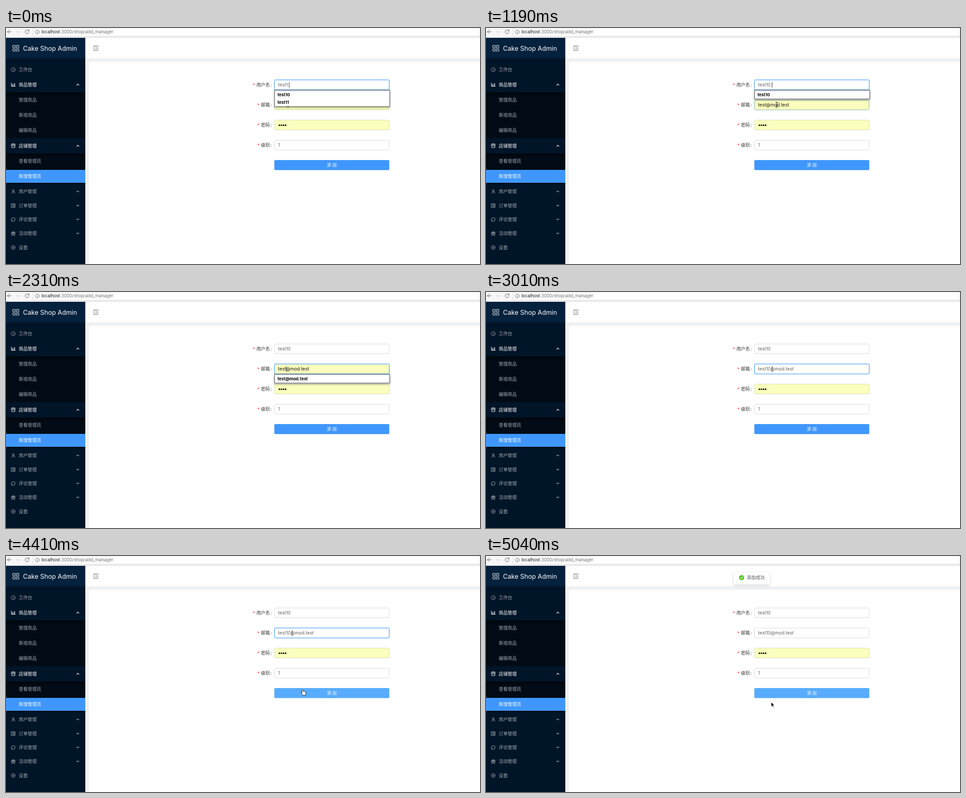
These frames come from a looping animation (1058x529 px, 5.11 s). An HTML page:

```html
<!DOCTYPE html>
<html lang="zh-CN">
<head>
<meta charset="utf-8">
<title>Admin form</title>
<style>
  html, body { margin: 0; width: 100%; height: 100%; overflow: hidden; background: #fff; }
  svg { display: block; width: 1058px; height: 529px; }
  text { font: 10px Inter, "Noto Sans CJK SC", sans-serif; white-space: pre; }
  .zh { font-family: "Noto Sans CJK SC", sans-serif; }
  .line { fill: none; stroke-width: 1; stroke-linecap: round; stroke-linejoin: round; }
  .value { fill: #606060; letter-spacing: .04px; }
  .bold { font-size: 9.3px; font-weight: 700; fill: #000; }
</style>
</head>
<body>
<svg viewBox="0 0 1058 529">
  <defs>
    <filter id="soft" x="-20%" y="-60%" width="140%" height="240%">
      <feDropShadow dx="0" dy="2" stdDeviation="2.6" flood-color="#000" flood-opacity=".35"/>
    </filter>
    <filter id="toastShade" x="-30%" y="-60%" width="160%" height="240%">
      <feDropShadow dx="0" dy="2.5" stdDeviation="3" flood-color="#000" flood-opacity=".17"/>
    </filter>
    <linearGradient id="inset" x2="0" y2="1">
      <stop offset="0" stop-color="#000" stop-opacity=".5"/>
      <stop offset="1" stop-color="#000" stop-opacity="0"/>
    </linearGradient>
  </defs>

  <!-- Page -->
  <rect width="1058" height="529" fill="#fff"/>
  <path d="M177 68H1058V76H185V529H177Z" fill="#f0f1f3"/>

  <!-- Browser bar -->
  <rect width="1058" height="22" fill="#f7f7f7"/>
  <path d="M60.5 0V16Q60.5 18.5 63 18.5H1058V0Z" fill="#fff" stroke="#d2d2d2"/>
  <path d="M0 21.5H1058" stroke="#d8d8d8"/>
  <g class="line" stroke="#5a5a5a" stroke-width="1.2">
    <path d="M11.5 8.5H3M7 4.5L3 8.5L7 12.5"/>
    <path d="M22.500 8.5H31M27 4.5L31 8.5L27 12.500" stroke="#d0d0d0"/>
    <path d="M50.700 6A4.300 4.300 0 1 0 51.300 9.500M51.400 3.800V6.800H48.400"/>
    <circle cx="70" cy="8.800" r="4.300"/>
    <path d="M70 8.500V11M70 6.600V6.700"/>
  </g>
  <text x="79" y="12.300" style="font-size:9.700px" fill="#707070"><tspan fill="#111">localhost</tspan>:3000/shop/add_manager</text>

  <!-- Sidebar -->
  <rect y="22" width="177" height="507" fill="#011528"/>
  <rect y="22" width="177" height="46" fill="#04213d"/>
  <g class="line" stroke="#fff" stroke-width="1.300">
    <path d="M15.600 39H20.600V44H15.600ZM23.600 39H28.600V44H23.600ZM15.600 46.800H20.600V51.800H15.600ZM23.600 46.800H28.600V51.800H23.600Z"/>
  </g>
  <text x="38" y="50.500" style="font-size:14.300px" fill="#fff">Cake Shop Admin</text>
  <g fill="#000b16"><rect y="144" width="177" height="103"/><rect y="281" width="177" height="69"/></g>
  <g fill="url(#inset)"><rect y="144" width="177" height="8"/><rect y="281" width="177" height="8"/></g>
  <rect y="318" width="177" height="29" fill="#3f97fd"/>
  <g id="menu"></g>

  <g class="line" stroke="#444" stroke-width="1.100">
    <path d="M195 40.500H206M200 45H206M195 49.500H206"/>
    <path d="M197.500 43.200L195 45L197.500 46.800Z" fill="#444" stroke="none"/>
  </g>

  <!-- Form -->
  <g id="form"></g>
  <g id="button">
    <rect id="face" x="599" y="296" width="256.500" height="22.500" rx="2.500"/>
    <text class="zh" x="716" y="311" fill="#fff">添 加</text>
  </g>
  <g id="list">
    <rect id="listBox" x="599.500" width="257" fill="#fff" stroke="#4a4a4a" filter="url(#soft)"/>
    <text id="item0" class="bold" x="606"></text>
    <text id="item1" class="bold" x="606"></text>
  </g>
  <path id="caret" stroke="#222"/>

  <g id="toast">
    <rect x="553" y="36" width="80.500" height="27.500" rx="2.500" fill="#fff" filter="url(#toastShade)"/>
    <circle cx="570.500" cy="48.500" r="5.700" fill="#52c41a"/>
    <path class="line" d="M568 48.700L570 50.700L573.200 46.700" stroke="#fff" style="stroke-width:1.300"/>
    <text class="zh" x="582" y="52.300" fill="#555">添加成功</text>
  </g>

  <!-- Pointers, each with its hot spot at 0,0 -->
  <g id="beam" class="line">
    <path d="M-2.500 -6Q0 -6 0 -4.500Q0 -6 2.500 -6M0 -5V5M-2.500 6Q0 6 0 4.500Q0 6 2.500 6M-1.300 2H1.300" stroke="#222"/>
  </g>
  <path id="arrow" d="M0 0V10.200L2.400 8L4 11.800L5.800 11L4.200 7.400H7.200Z" fill="#000" stroke="#fff" stroke-width=".8"/>
  <path id="hand" d="M-3.600 -5.600C-2.600 -6.400 -1.800 -5.600 -1.500 -4.700L-.7 -2.200C.2 -3.200 1.300 -2.800 1.600 -2C2.500 -2.700 3.300 -2.200 3.600 -1.400C4.700 -1.800 5.300 -.8 5.300 .4C5.400 2.500 4.900 3.900 4.300 6.300H-1.400C-2 4.600 -4 3 -5 1.500C-5.400 .4 -4.300 -.2 -2.900 1.100L-4.100 -4.200C-4.300 -4.900 -4.100 -5.300 -3.600 -5.600Z" fill="#fff" stroke="#111"/>
</svg>

<script>
const LOOP = 5110, STEP = 70;
const $ = id => document.getElementById(id);
const set = (el, attrs) => { for (const k in attrs) el.setAttribute(k, attrs[k]); };
const show = (el, on) => el.setAttribute('visibility', on ? 'visible' : 'hidden');
const clamp = v => Math.min(1, Math.max(0, v));
const ease = v => { v = clamp(v); return 1 - (1 - v) ** 2.2; };
const fade = (t, from, ms = 300) => ease((t - from) / ms);
const mix = (a, b, k) => `rgb(${a.map((v, i) => Math.round(v + (b[i] - v) * k))})`;

// Sidebar rows: label, centre y, icon path, chevron direction
const icons = {
  gauge: 'M-3.500 3.500A4.500 4.500 0 1 1 3.500 3.500ZM0 1L2 -1.500',
  chart: 'M-4.300 -4V3.800H4.500M-2.500 2V0L-.5 -2L1 -.5L3.500 -3V2Z',
  shop: 'M-3.800 -4H3.800L4.300 -.8Q2.800 1 1.400 -.8Q0 1 -1.400 -.8Q-2.800 1 -4.300 -.8ZM-3.600 .5V4H3.600V.5M-1.400 -4V-1M1.400 -4V-1',
  user: 'M0 -4A2.300 2.300 0 1 1 0 .6A2.300 2.300 0 1 1 0 -4M-3.500 4Q-3.200 .8 0 .8Q3.200 .8 3.500 4',
  order: 'M-4 -4H4V4H-4ZM-2.300 -2H-2M-.5 -2H2.300M-2.300 0H-2M-.5 0H2.300M-2.300 2H-2M-.5 2H2.300',
  chat: 'M-4.200 4L-3.700 1.900A4.200 4.200 0 1 1 -2 3.700ZM-2 0H-1.900M0 0H.1M2 0H2.100',
  gift: 'M-4 -2H4V.3H-4ZM-3.400 .3V4H3.400V.3M0 -2V4M0 -2Q-3 -2 -2 -4Q-.5 -4.500 0 -2Q.5 -4.500 2 -4Q3 -2 0 -2',
  gear: 'M-1.600 -4.200H1.600L4 -2.200V2.200L1.600 4.200H-1.600L-4 2.200V-2.200ZM0 -1.600A1.600 1.600 0 1 1 0 1.600A1.600 1.600 0 1 1 0 -1.600'
};
const rows = [
  ['工作台', 93, 'gauge'],
  ['商品管理', 127, 'chart', 'up'], ['管理商品', 161], ['新增商品', 195.500], ['编辑商品', 229.500],
  ['店铺管理', 264, 'shop', 'up'], ['查看管理员', 298], ['新增管理员', 332],
  ['用户管理', 366.500, 'user', 'down'], ['订单管理', 398, 'order', 'down'],
  ['评论管理', 429, 'chat', 'down'], ['活动管理', 460.500, 'gift', 'down'], ['设置', 492, 'gear']
];
$('menu').innerHTML = rows.map(([label, y, icon, chevron]) => {
  const color = chevron === 'up' || y === 332 ? '#fff' : '#a3abb3';
  const s = chevron === 'up' ? 1 : -1;
  return `<text class="zh" x="28.500" y="${y + 3.700}" fill="${color}">${label}</text>` +
    (icon ? `<path class="line" d="${icons[icon]}" transform="translate(16.300 ${y})" stroke="${color}"/>` : '') +
    (chevron ? `<path class="line" d="M157.800 ${y + s * 1.200}L160.300 ${y - s * 1.200}L162.800 ${y + s * 1.200}" stroke="${color}" style="stroke-width:1.200"/>` : '');
}).join('');

// Form rows
const fields = [['用户名', 'user', 116.500], ['邮箱', 'mail', 161.500], ['密码', 'pass', 206.500], ['级别', 'level', 251.500]];
$('form').innerHTML = fields.map(([label, id, y]) => {
  const x = 589 - label.length * 10;
  return `<text x="${x - 8}" y="${y + 15.500}" fill="#e5333c">*</text>
    <text class="zh" x="${x}" y="${y + 14.800}" fill="#333">${label}</text>
    <text x="590.500" y="${y + 14.300}" fill="#333">:</text>
    <rect id="${id}Glow" x="598" y="${y - 1.500}" width="259" height="25" rx="4" fill="#3f97fd"/>
    <rect id="${id}Box" x="599.500" y="${y}" width="255.700" height="22" rx="2.500" fill="${id === 'pass' ? '#faffbd' : '#fff'}" stroke="${id === 'pass' ? '#d6dbb8' : '#d9d9d9'}"/>
    <text id="${id}" class="value" x="607.300" y="${y + 14.700}"></text>`;
}).join('');
$('level').textContent = '1';
$('form').insertAdjacentHTML('beforeend', [0, 1, 2, 3].map(i =>
  `<circle cx="${610.200 + i * 4.600}" cy="218" r="1.800"/>`).join(''));

// Moments of the scene
const KEY0 = 140, CLICK_MAIL = 1400, CLICK_TEXT = 1820, ARROW_KEY = 2310,
  KEY1 = 2800, KEY2 = 2940, HOVER = 3990, SUBMIT = 4480, TOAST = 4620;

// Caret: start, x, row top; it blinks from each start
const carets = [[0, 632, 116.500], [KEY0, 638.500, 116.500], [CLICK_MAIL, 649, 161.500],
  [CLICK_TEXT, 621.500, 161.500], [ARROW_KEY, 626, 161.500], [KEY1, 631, 161.500], [KEY2, 638.500, 161.500]];

// Pointer trips: time, x, y
const trips = [
  [[350, 664, 416], [560, 660, 380], [1050, 650, 178], [1190, 649, 172], [1400, 649, 172],
   [1680, 622, 177], [2309, 622, 177]],
  [[3430, 624, 178], [3990, 652, 298], [4270, 664, 306], [4690, 664, 306], [4970, 641, 324], [5040, 636.500, 327.500], [5110, 636, 328]]
];

function pointerAt(t) {
  const trip = trips.find(p => t >= p[0][0] && t <= p[p.length - 1][0]);
  if (!trip) return null;
  const i = Math.max(1, trip.findIndex(p => p[0] >= t));
  const [a, b] = [trip[i - 1], trip[i]];
  const k = clamp((t - a[0]) / (b[0] - a[0]));
  return [a[1] + (b[1] - a[1]) * k, a[2] + (b[2] - a[2]) * k];
}

function drawField(id, focus, fill, idle) {
  set($(id + 'Glow'), { opacity: .28 * focus });
  set($(id + 'Box'), { fill, stroke: mix(idle, [75, 160, 245], focus) });
}

function drawPointer(t) {
  const p = pointerAt(t);
  let kind = '';
  if (p) {
    const inField = fields.some(f => p[1] >= f[2] && p[1] <= f[2] + 22);
    kind = inField ? 'beam' : p[1] >= 296 && p[1] <= 318 ? 'hand' : 'arrow';
    set($(kind), { transform: `translate(${p})` });
  }
  for (const id of ['beam', 'hand', 'arrow']) show($(id), id === kind);
}

function drawList(t) {
  const items = t < KEY0 ? ['test10', 'test11'] : t < CLICK_MAIL ? ['test10'] : ['test@mod.test'];
  const y = t < CLICK_MAIL ? 139.500 : 184.500;
  show($('list'), t < KEY1);
  set($('listBox'), { y, height: items.length * 17 + 2.500 });
  for (const i of [0, 1]) {
    $('item' + i).textContent = items[i] || '';
    set($('item' + i), { y: y + 13.300 + i * 17 });
  }
}

function draw(t) {
  $('user').textContent = t < KEY0 ? 'test1' : 'test10';
  $('mail').textContent = (t < KEY1 ? 'test' : t < KEY2 ? 'test1' : 'test10') + '@mod.test';
  $('mail').style.fill = t < KEY1 ? '#111' : '';

  const typed = fade(t, KEY1);
  const hover = fade(t, 1000) * .75;
  const idle = [214, 219, 184].map((v, i) => v + ([80, 150, 190][i] - v) * (t < CLICK_MAIL ? hover : 0));
  drawField('user', 1 - fade(t, CLICK_MAIL, 280), '#fff', [217, 217, 217]);
  drawField('mail', fade(t, CLICK_MAIL, 280) - fade(t, SUBMIT), mix([250, 255, 189], [255, 255, 255], typed),
    t < KEY1 ? idle : [217, 217, 217]);
  for (const id of ['pass', 'level']) set($(id + 'Glow'), { opacity: 0 });
  set($('face'), { fill: mix([63, 151, 253], [88, 172, 253], fade(t, HOVER)) });

  const [start, x, top] = carets.filter(c => c[0] <= t).pop();
  set($('caret'), { d: `M${x} ${top + 5}v12` });
  show($('caret'), t < SUBMIT && (t - start) % 1000 < 500);

  const k = fade(t, TOAST);
  set($('toast'), { opacity: k, transform: `translate(0 ${-22 * (1 - k)})` });
  drawList(t);
  drawPointer(t);
}

const origin = performance.now();
function tick() {
  const t = (performance.now() - origin) % LOOP;
  draw(Math.floor(t / STEP) * STEP);
  requestAnimationFrame(tick);
}
tick();
</script>
</body>
</html>
```
